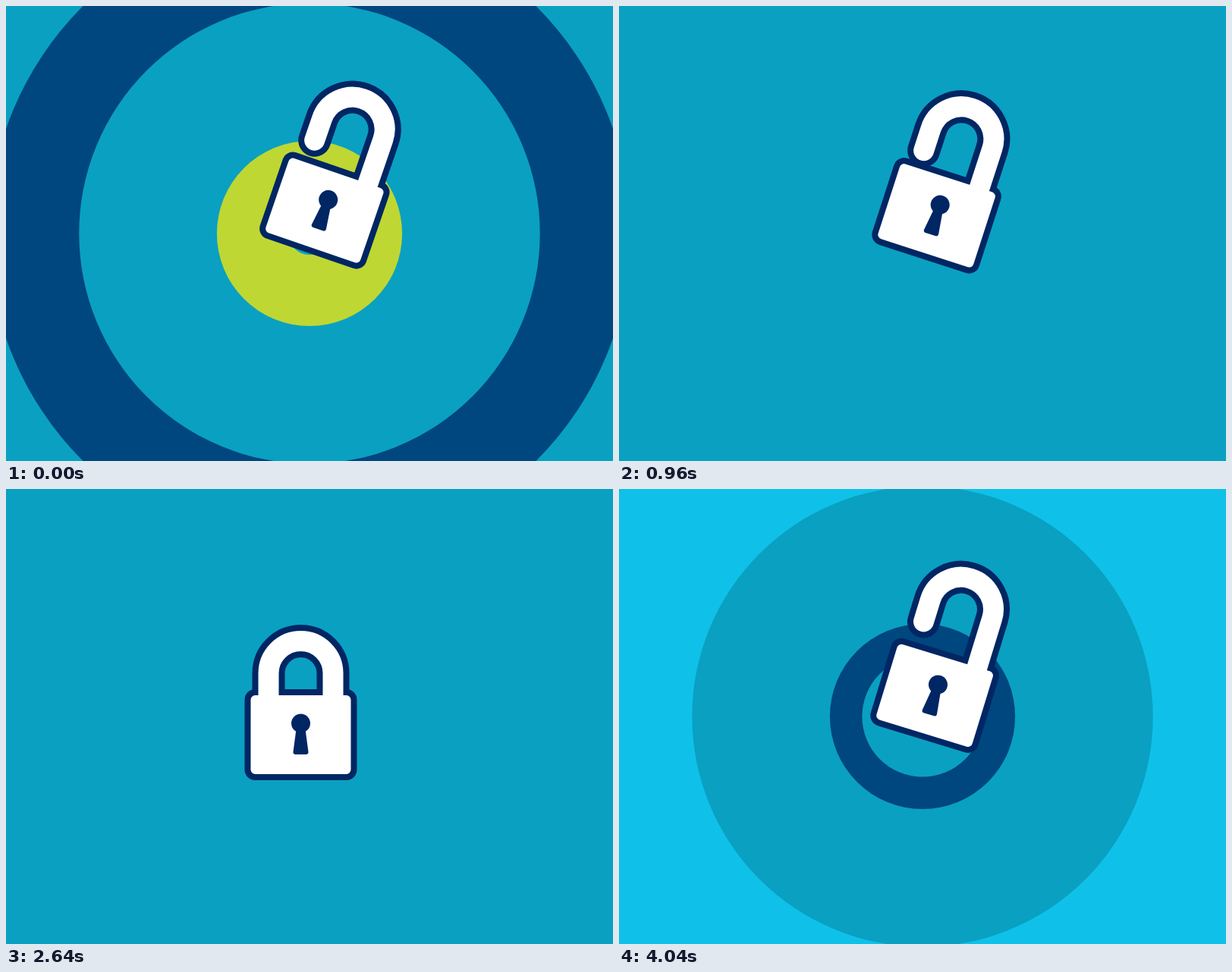
Write an HTML page that moves like this. It is 800 px wide and 600 px high and loops after 4080 ms.

```html
<!DOCTYPE html>
<html lang="en">
<head>
<meta charset="utf-8">
<title>Padlock</title>
<style>
  html, body { margin: 0; width: 100%; height: 100%; overflow: hidden; background: #0aa0c1; }
  svg { display: block; width: 100vw; height: 100vh; }
</style>
</head>
<body>
<svg viewBox="0 0 800 600">
  <rect width="800" height="600" fill="#0aa0c1"/>
  <g id="ripples"></g>
  <g id="streaks" stroke="#a9dc5f" stroke-width="9" stroke-linecap="round"></g>
  <g id="rays" stroke="#fff" stroke-width="4" stroke-linecap="round"></g>
  <g id="lock" stroke-linecap="round" stroke-linejoin="round">
    <rect id="bodyEdge" x="-66" y="-37" width="132" height="104" rx="6" stroke="#002663"/>
    <path id="shackleEdge" class="shackle" fill="none" stroke="#002663"/>
    <rect x="-66" y="-37" width="132" height="104" rx="6" fill="#fff"/>
    <path class="shackle" fill="none" stroke="#fff" stroke-width="27"/>
    <g fill="#002663">
      <circle r="12.5"/>
      <path d="M-3 8H3L7 38H-7Z" stroke="#002663" stroke-width="6"/>
    </g>
  </g>
</svg>
<script>
const LOOP = 4080, STEP = 40, LEG = 42.5;
const TEAL = '#0aa0c1';
const $ = id => document.getElementById(id);
const set = (el, attrs) => { for (const k in attrs) el.setAttribute(k, attrs[k]); };
const add = (parent, tag, attrs = {}) => {
  const el = document.createElementNS('http://www.w3.org/2000/svg', tag);
  set(el, attrs);
  return parent.appendChild(el);
};
const span = (t, from, to) => Math.min(1, Math.max(0, (t - from) / (to - from)));
const smooth = p => p * p * (3 - 2 * p);
const easeIn = p => p ** 3;
const easeOut = p => 1 - (1 - p) ** 3;
const easeOutQuad = p => 1 - (1 - p) ** 2;

function blend(a, b, p) {
  const out = {};
  for (const k in a) out[k] = a[k] + (b[k] - a[k]) * p;
  return out;
}

// x and y locate the keyhole; swing -1 turns the shackle over its right leg
const open = { x: 427, y: 254, turn: 20, lift: 29, scale: 1, swing: 1 };
const arrived = { ...open, x: 418.2, y: 259.4, turn: 16, lift: 41 };
const away = { x: 477, y: 599, turn: -45, lift: 38, scale: .14, swing: -1 };

// Damped oscillation from 1 to 0
function wobble(t, start) {
  const age = Math.max(0, t - start);
  return Math.cos(2 * Math.PI * age / 780) * (1 - span(age, 0, 1350)) ** 2;
}

function closed(t) {
  const bounce = wobble(t, 1250), sway = wobble(t, 1350);
  return {
    x: 388.5 - 8.3 * sway, y: 309 + 45 * bounce,
    turn: -5.4 * sway, lift: -17 * bounce, scale: 1, swing: 1
  };
}

function lockPose(t) {
  let pose = blend(open, closed(t), easeIn(span(t, 800, 1170)));
  pose = blend(pose, away, easeIn(span(t, 3400, 3520)));
  pose = blend(pose, arrived, easeOut(span(t, 3560, 3960)));
  return blend(pose, open, smooth(span(t, 4000, 4120)));
}

function drawLock({ x, y, turn, lift, scale, swing }) {
  const cy = -66 - lift, outline = 16 / scale; // the outline keeps its width at any scale
  set($('lock'), { transform: `translate(${x} ${y}) rotate(${turn}) scale(${scale})` });
  set($('bodyEdge'), { 'stroke-width': outline });
  set($('shackleEdge'), { 'stroke-width': 27 + outline });
  for (const el of document.querySelectorAll('.shackle')) set(el, {
    d: `M${-LEG} ${cy + 30}V${cy}A${LEG} ${LEG} 0 0 1 ${LEG} ${cy}V${cy + 75}`,
    transform: `translate(${LEG}) scale(${swing} 1) translate(${-LEG})`
  });
}

const ripples = [
  ['#0fc1e9', 3600], [TEAL, 3972], ['#00467f', 4000], [TEAL, 4012], ['#bed733', 4040], [TEAL, 4080]
].map(([fill, start]) => ({ start, el: add($('ripples'), 'circle', { cx: 400, cy: 300, fill }) }));

function rippleRadius(steps) {
  const r = 1260 / (1 + Math.exp(1.55 * (2.44 - steps)));
  return r < 3 ? 0 : r;
}

const makeLines = (id, count, first, gap) => Array.from({ length: count }, (_, i) =>
  ({ angle: (first + gap * i) * Math.PI / 180, el: add($(id), 'line') }));
const streaks = makeLines('streaks', 4, -41, 100);
const rays = makeLines('rays', 8, 4, 45);

function drawLine({ angle, el }, from, to) {
  const cos = Math.cos(angle), sin = Math.sin(angle);
  set(el, {
    x1: 377.5 + from * cos, y1: 322 + from * sin,
    x2: 377.5 + to * cos, y2: 322 + to * sin,
    visibility: to - from > .5 ? 'visible' : 'hidden'
  });
}

function draw(time) {
  // The first picture is held for two steps, and the opening continues the end of the loop
  const frame = Math.floor(time / STEP) * STEP;
  const t = frame < 800 ? LOOP + Math.max(0, frame - STEP) : frame;

  for (const { start, el } of ripples) set(el, { r: rippleRadius((t - start) / STEP) });

  const travel = start => smooth(span(t, start, start + 400));
  streaks.forEach((line, i) => {
    const reach = 324 - 31 * i;
    drawLine(line, reach * travel(1242), reach * travel(1202));
  });
  const spread = start => 95 + 85 * easeOutQuad(span(t, start, start + 300));
  for (const line of rays) drawLine(line, spread(1330), spread(1280));

  drawLock(lockPose(t));
}

const origin = performance.now();
function tick() {
  draw((performance.now() - origin) % LOOP);
  requestAnimationFrame(tick);
}
tick();
</script>
</body>
</html>
```
